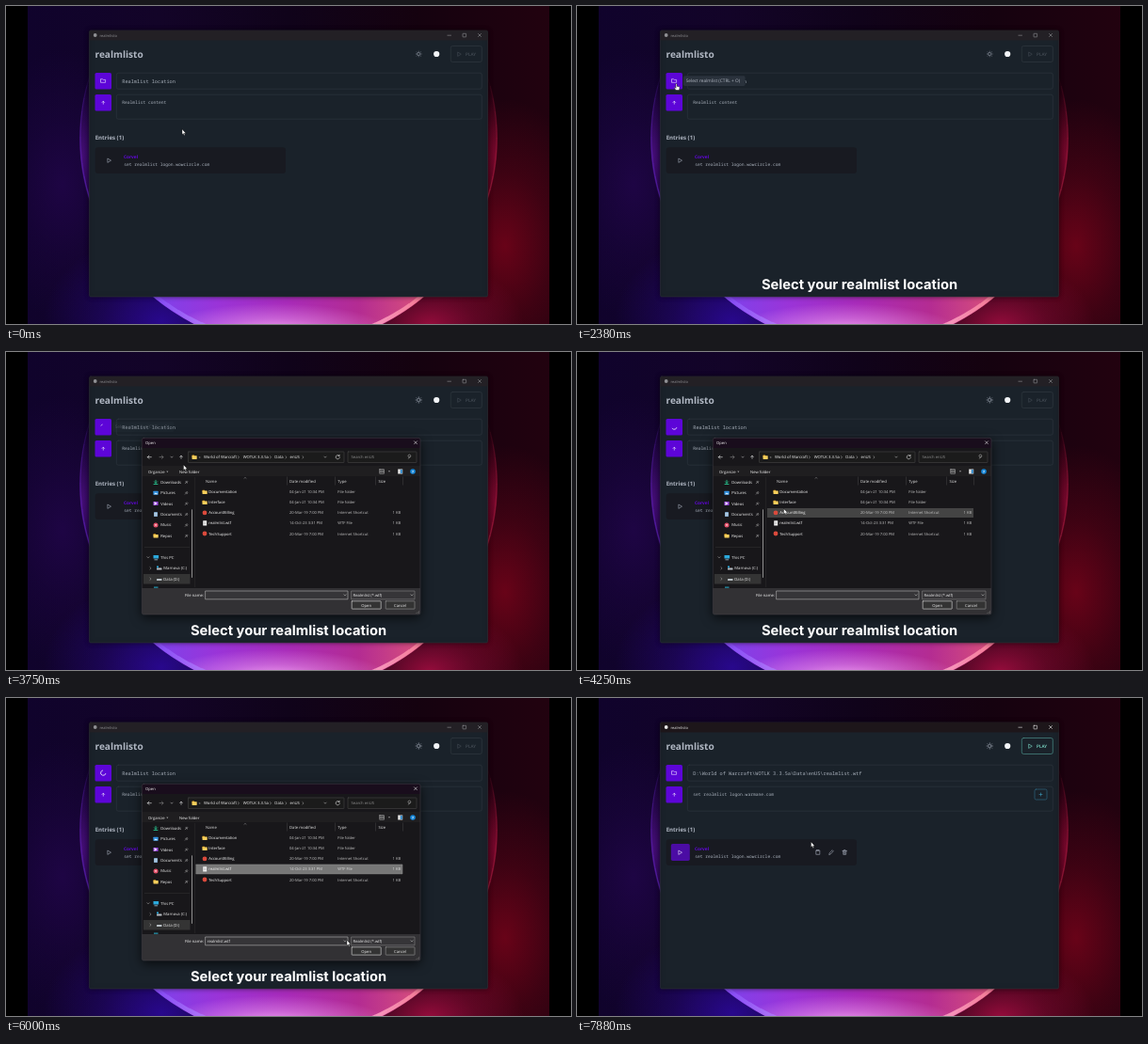
Recreate the animation shown at these times as an HTML page with a canvas. Size 600 px wide and 338 px high, loop 8000 ms.

```html
<!DOCTYPE html>
<html lang="en">
<head>
<meta charset="utf-8">
<title>realmlisto</title>
<style>
  html, body { margin: 0; width: 100%; height: 100%; overflow: hidden; background: #000; }
  canvas { display: block; width: 100vw; height: 100vh; }
</style>
</head>
<body>
<canvas id="stage"></canvas>
<script>
const W = 600, H = 338, LOOP = 8000, TICK = 125;
const SANS = '"Open Sans", "Noto Sans", sans-serif';
const MONO = '"Noto Sans Mono", "DejaVu Sans Mono", monospace';
const canvas = document.getElementById('stage');
const back = document.createElement('canvas');
let c;

const CLICK = 2400, DIALOG_IN = 2875, PICK = 4625, DIALOG_OUT = 6500;
// time, x, y of the pointer tip
const PATH = [
  [0, 187, 131], [375, 187, 131], [1000, 137.5, 99], [1750, 105.5, 82.5],
  [3375, 105.5, 82.5], [3750, 188.5, 120], [4500, 230.5, 183], [5125, 230.5, 183],
  [6000, 362, 257.5], [6250, 381, 268], [6625, 381, 268], [7875, 248.5, 153]
];

const clamp = v => Math.max(0, Math.min(1, v));
const smooth = v => { v = clamp(v); return v * v * (3 - 2 * v); };
const ramp = (t, a, b) => smooth((t - a) / (b - a));

function pointerAt(t) {
  let i = 1;
  while (i < PATH.length - 1 && t > PATH[i][0]) i++;
  const [a, ax, ay] = PATH[i - 1], [b, bx, by] = PATH[i];
  const k = ramp(t, a, b);
  return { x: ax + (bx - ax) * k, y: ay + (by - ay) * k };
}

function box(x, y, w, h, r, fill, stroke, lw = 0.6) {
  c.beginPath();
  c.roundRect(x, y, w, h, r);
  if (fill) { c.fillStyle = fill; c.fill(); }
  if (stroke) { c.strokeStyle = stroke; c.lineWidth = lw; c.stroke(); }
}

function text(s, x, y, size, color, { font = SANS, weight = 400, align = 'left' } = {}) {
  c.font = `${weight} ${size}px ${font}`;
  c.textAlign = align;
  c.fillStyle = color;
  c.fillText(s, x, y);
}

const mono = (s, x, y, size, color) => text(s, x, y, size, color, { font: MONO });

function disc(x, y, r, fill) {
  c.beginPath();
  c.arc(x, y, r, 0, 7);
  c.fillStyle = fill;
  c.fill();
}

// Strokes (or fills) an SVG path moved to x, y
function shape(d, x, y, stroke, lw = 0.6, fill) {
  c.save();
  c.translate(x, y);
  const p = new Path2D(d);
  if (fill) { c.fillStyle = fill; c.fill(p); }
  if (stroke) {
    c.strokeStyle = stroke; c.lineWidth = lw;
    c.lineCap = c.lineJoin = 'round';
    c.stroke(p);
  }
  c.restore();
}

const ICON = {
  folder: 'M-2.4 -1.8H-.9L-.1 -1.1H2.3V1.8H-2.4Z',
  up: 'M0 1.5V-1.4M-1.3 -.2L0 -1.5L1.3 -.2',
  back: 'M2 0H-2M-.4 -1.6L-2 0L-.4 1.6',
  play: 'M-1.5 -2L1.8 0L-1.5 2Z',
  plus: 'M-1.5 0H1.5M0 -1.5V1.5',
  cross: 'M-1.5 -1.5L1.5 1.5M1.5 -1.5L-1.5 1.5',
  right: 'M-.6 -1.1L.6 0L-.6 1.1',
  down: 'M-1.1 -.6L0 .6L1.1 -.6',
  clip: 'M-1 -2H-2V2.3H2V-2H1M-1 -2.5H1V-1.6H-1Z',
  pen: 'M-2.2 2.2L-1.8 .6L1.2 -2.3L2.3 -1.2L-.6 1.8Z',
  bin: 'M-2.2 -1.6H2.2M-1.7 -1.6L-1.4 2.4H1.4L1.7 -1.6M-.8 -1.7V-2.4H.8V-1.7M-.5 -.5V1.3M.5 -.5V1.3',
  pin: 'M-1.3 1.5L0 .2M-.7 -.5L.8 1M-.4 -.2L.6 -1.4L1.6 -.4L.6 .6',
  arrow: 'M0 0V5.6L1.3 4.5L2.2 6.4L3.1 6L2.2 4.2H3.9Z',
  beam: 'M-1.2 -3H-.3L0 -2.6L.3 -3H1.2M0 -2.6V2.6M-1.2 3H-.3L0 2.6L.3 3H1.2',
  hand: 'M-.6 .3Q0 -.4 .6 .3V2.8L3 3.3Q3.7 3.6 3.5 4.6L3 7H-.5L-2.3 4.6Q-2.1 3.5 -.6 4.6Z'
};

function gradient(g, ...stops) {
  stops.forEach((s, i) => g.addColorStop(i / (stops.length - 1), s));
  return g;
}

function glow(x, y, r, color, sx = 1, sy = 1) {
  c.save();
  c.translate(x, y);
  c.scale(sx, sy);
  c.fillStyle = gradient(c.createRadialGradient(0, 0, 0, 0, 0, r), `rgba(${color},1)`, `rgba(${color},.42)`, `rgba(${color},0)`);
  c.fillRect(-r, -r, 2 * r, 2 * r);
  c.restore();
}

function drawBackdrop() {
  c.fillStyle = '#000';
  c.fillRect(0, 0, W, H);
  c.save();
  c.beginPath();
  c.rect(23, 0, 554, H);
  c.clip();
  c.fillStyle = gradient(c.createLinearGradient(23, 0, 577, 0), '#10032c', '#130428', '#10031a', '#15020f', '#22020f');
  c.fillRect(23, 0, 554, H);
  glow(60, 190, 120, '30,5,68', 0.7, 1.2);
  glow(165, 335, 125, '40,8,140', 1, 0.75);
  glow(530, 255, 130, '104,3,24', 0.75, 1.2);
  glow(450, 340, 100, '150,12,60', 1, 0.7);

  const hue = c.createLinearGradient(78, 0, 522, 0);
  gradient(hue, '#5a20b8', '#8a50f5', '#d59cfa', '#f7aee6', '#f5809c', '#a01838');
  c.save();
  c.beginPath();
  c.arc(300, 140, 222, 0, 7);
  c.clip();
  // thin lit crescents beside the app
  glow(80, 160, 75, '70,14,120', 0.3, 1.1);
  glow(520, 160, 75, '118,8,44', 0.3, 1.1);
  c.fillStyle = gradient(c.createLinearGradient(150, 0, 450, 0), '#7a44ee', '#9a34d8', '#a82bb8', '#b42c92', '#dd5578');
  c.fillRect(78, 300, 444, 38);
  glow(285, 348, 100, '246,168,244', 1.25, 0.32);
  c.restore();

  // the rim is brightest and widest at the bottom
  for (let i = 0; i < 64; i++) {
    const a = Math.PI * (-0.14 + i * 0.02), low = Math.max(0, Math.sin(a));
    c.globalAlpha = clamp(0.55 * smooth((Math.sin(a) + 0.42) / 0.5) + 0.6 * low);
    c.strokeStyle = hue;
    c.lineWidth = 1 + 4.5 * low * low;
    c.beginPath();
    c.arc(300, 140, 221.5 - c.lineWidth / 2, a, a + Math.PI * 0.0205);
    c.stroke();
  }
  c.restore();
}

function drawSpinner(t) {
  const s = (t - CLICK) / 1000, p = (s % 1.5) / 1.5, len = 59.7;
  const grow = smooth(p / 0.475);
  const from = 16 * grow + 43 * smooth((p - 0.475) / 0.525);
  const to = Math.min(len, from + 42 * grow);
  const turn = s * Math.PI, unit = 2 * Math.PI / len;
  c.strokeStyle = '#e4dcfa';
  c.lineWidth = 0.9;
  c.lineCap = 'round';
  c.beginPath();
  c.arc(103.3, 79.6, 2.7, from * unit + turn, to * unit + turn);
  c.stroke();
}

function drawSun(x, y) {
  c.strokeStyle = '#a6adbb';
  c.lineWidth = 0.6;
  c.beginPath();
  c.arc(x, y, 1.6, 0, 7);
  for (let i = 0; i < 8; i++) {
    const u = Math.cos(i * Math.PI / 4), v = Math.sin(i * Math.PI / 4);
    c.moveTo(x + u * 2.4, y + v * 2.4);
    c.lineTo(x + u * 3.2, y + v * 3.2);
  }
  c.stroke();
}

function drawApp(t, ptr, modal) {
  const loaded = t >= DIALOG_OUT, active = t >= CLICK && !modal;
  c.save();
  c.shadowColor = 'rgba(0,0,0,.5)';
  c.shadowBlur = 5;
  box(88.5, 26, 423, 283, 1.5, '#1a222a', '#30343a', 0.5);
  c.restore();
  box(88.5, 26, 423, 10.5, [1.5, 1.5, 0, 0], active ? '#1d161a' : '#232025');
  const bar = active ? '#e8e8e8' : '#909094';
  disc(94.7, 31, 1.9, bar);
  text('realmlisto', 99.5, 32.6, 4, bar);
  shape('M-1.8 0H1.8', 470.7, 31.2, bar, 0.6);
  box(485, 29.3, 3.6, 3.6, 0.3, null, bar, 0.6);
  shape(ICON.cross, 503, 31, bar, 0.6);

  text('realmlisto', 94.5, 55, 10.1, '#b0b7c3', { weight: 700 });
  drawSun(438.3, 51);
  disc(457.2, 51, 3.1, '#f2f4f7');
  box(472.3, 42.5, 33, 17, 2, null, loaded ? '#4b8f88' : '#303840', 0.7);
  const go = loaded ? '#7fe0cc' : '#444c55';
  shape(ICON.play, 481.5, 51.2, go, 0.6);
  text('PLAY', 488, 53, 4.7, go, { weight: 600 });

  box(94.5, 71, 17.5, 17.5, 1.6, '#5d05d8');
  if (t >= CLICK && !loaded) drawSpinner(t);
  else shape(ICON.folder, 103.3, 79.5, '#ece4ff', 0.6);
  box(94.5, 94, 17.5, 17.5, 1.6, '#5d05d8');
  shape(ICON.up, 103.3, 102.7, '#ece4ff', 0.65);

  box(117.3, 71.2, 388, 17, 2, null, '#303840');
  box(117.3, 94.2, 388, 26, 2, null, '#303840');
  const ink = '#a8b0bb';
  mono(loaded ? 'D:\\World of Warcraft\\WOTLK 3.3.5a\\Data\\enUS\\realmlist.wtf' : 'Realmlist location', 123.3, 81.8, 5.24, ink);
  mono(loaded ? 'set realmlist logon.warmane.com' : 'Realmlist content', 123.3, 103.6, 4.62, ink);
  if (loaded) {
    box(486, 97, 13, 11, 1.6, null, '#2f657e', 0.7);
    shape(ICON.plus, 492.5, 102.5, '#3c9cbc', 0.6);
  }

  text('Entries (1)', 94.7, 141.5, 6.1, '#b0b7c3', { weight: 700 });
  box(94.7, 150.2, 202.3, 27.8, 3, '#181a21');
  const over = !modal && ptr.x > 95 && ptr.x < 297 && ptr.y > 150.2 && ptr.y < 178;
  if (over) {
    box(99.8, 155, 20, 18, 1.8, '#4b0ca4');
    [ICON.clip, ICON.pen, ICON.bin].forEach((d, i) => shape(d, 255.8 + i * 14.2, 164, '#a6adbb', 0.6));
  }
  shape(ICON.play, 109.7, 164.2, over ? '#ece4ff' : '#a6adbb', 0.6);
  text('Corvel', 125, 162.3, 4.75, '#6207dd', { weight: 700 });
  mono('set realmlist logon.wowcircle.com', 125.2, 169.8, 4.6, ink);

  const tip = ramp(t, 1875, 2125) * (1 - ramp(t, 3500, 3875));
  if (tip > 0) {
    c.globalAlpha = tip;
    box(113, 74.3, 65.6, 10.8, 1.8, '#2a323c');
    text('Select realmlist (CTRL + O)', 115.7, 81.3, 4.75, '#b4bac5');
    c.globalAlpha = 1;
  }
}

function fileFolder(x, y) {
  box(x - 2.5, y - 2.1, 2.6, 2, 0.3, '#d99a1e');
  box(x - 2.5, y - 1.4, 5.2, 3.6, 0.4, '#f6cf5c');
}

function drawNav() {
  const white = '#f0f0f0';
  ['Downloads', 'Pictures', 'Videos', 'Documents', 'Music', 'Repos'].forEach((name, i) => {
    const y = 138.3 + i * 11.4;
    if (i === 0) shape('M0 -2V1M-1.5 -.4L0 1.1L1.5 -.4M-2 2.2H2', 159, y, '#28c08c', 0.9);
    if (i === 1) { box(156.4, y - 2, 5.2, 4, 0.5, '#2f8fe0'); shape('M-2 1.5L-.3 -.3L.6 .6L1.3 0L2 1.5Z', 159, y, null, 0, '#d8f0ff'); }
    if (i === 2) { box(156.4, y - 2, 5.2, 4, 0.5, '#8d3fd0'); shape(ICON.play, 159, y, null, 0, '#f0dcff'); }
    if (i === 3) { box(157, y - 2.5, 4, 5, 0.4, '#7fa6c9'); shape('M-1.1 -1H1.1M-1.1 .2H1.1M-1.1 1.3H.5', 159, y, '#fff', 0.4); }
    if (i === 4) { disc(159, y, 2.5, '#e2506a'); disc(159, y, 0.8, '#ffe4e4'); }
    if (i === 5) fileFolder(159, y);
    text(name, 164.2, y + 1.5, 4.2, white);
    shape(ICON.pin, 191.5, y, '#a8a8a8', 0.5);
  });
  c.fillStyle = '#333';
  c.fillRect(147, 207, 48, 0.5);
  shape(ICON.down, 151, 218.3, '#bbb', 0.5);
  box(156.5, 216, 5.6, 3.6, 0.4, '#2ba9dc');
  shape('M-1.4 0H1.4', 159.3, 220.8, '#bcdff0', 0.7);
  text('This PC', 164.2, 219.8, 4.2, white);
  box(146, 235.9, 49.5, 10.6, 0, '#343434');
  [['Marnova (C:)', 229.8], ['Data (D:)', 241.2]].forEach(([name, y], i) => {
    shape(ICON.right, 153.5, y, '#bbb', 0.5);
    box(160, y - 0.3, 5.5, 2.1, 0.5, '#b9c0c5');
    if (!i) box(160, y - 2.4, 2, 1.8, 0, '#2ba9dc');
    text(name, 167.3, y + 1.5, 4.2, white);
  });
  box(157, 249.5, 4.5, 1.3, 0, '#2490a8');
  // scroll thumb and pane divider
  box(197, 167, 0.9, 73, 0.4, '#9c9c9c');
  c.fillStyle = '#2d2d2d';
  c.fillRect(200.5, 133, 0.6, 117);
}

const FILES = [
  ['Documentation', '04-Jan-21 10:34 PM', 'File folder'],
  ['Interface', '04-Jan-21 10:34 PM', 'File folder'],
  ['AccountBilling', '20-Mar-19 7:00 PM', 'Internet Shortcut', '1 KB'],
  ['realmlist.wtf', '14-Oct-23 3:31 PM', 'WTF File', '1 KB'],
  ['TechSupport', '20-Mar-19 7:00 PM', 'Internet Shortcut', '1 KB']
];

function drawFiles(ptr, picked) {
  const dim = '#c6c6c6';
  [['Name', 212], ['Date modified', 301], ['Type', 352.3], ['Size', 395.5]].forEach(([s, x]) => text(s, x, 138.6, 4.2, '#e2e2e2'));
  shape('M-1.1 .5L0 -.5L1.1 .5', 254, 133.8, '#999', 0.5);
  c.fillStyle = '#444';
  for (const x of [298, 349.3, 392.5, 421.3]) c.fillRect(x, 132.5, 0.5, 9);
  FILES.forEach(([name, date, type, size], i) => {
    const y = 148.8 + i * 11.05, sel = picked && i === 3;
    const over = ptr.x > 202 && ptr.x < 421 && Math.abs(ptr.y - y) < 5.3;
    if (sel) box(202, y - 5, 219, 10, 0, '#777', '#8d8d8d', 0.5);
    else if (over) box(202, y - 5, 219, 10, 0, '#444');
    if (i < 2) fileFolder(211, y);
    else if (i === 3) { box(209.2, y - 2.6, 4, 5.2, 0.3, '#f0f0f0'); shape('M-1 -.8H1M-1 .4H1', 211.2, y, '#999', 0.4); }
    else disc(211, y, 2.4, '#db4a3c');
    const tone = sel ? '#dedede' : dim;
    text(name, 215.3, y + 1.5, 4.15, '#fafafa');
    text(date, 301, y + 1.5, 4.1, tone);
    text(type, 352.3, y + 1.5, 4.05, tone);
    if (size) text(size, 419, y + 1.5, 4.05, tone, { align: 'right' });
  });
}

function drawDialog(t, ptr) {
  const picked = t >= PICK, white = '#f4f4f4', grey = '#bdbdbd';
  c.save();
  c.shadowColor = 'rgba(0,0,0,.75)';
  c.shadowBlur = 12;
  c.shadowOffsetY = 3;
  box(144.3, 91.3, 295.7, 187.7, 2, '#18171a');
  c.restore();
  box(144.3, 91.3, 295.7, 10.7, [2, 2, 0, 0], '#190d1c');
  text('Open', 148, 98.2, 4.2, white);
  shape(ICON.cross, 435, 96.3, white, 0.55);

  shape(ICON.back, 152.3, 111.7, white, 0.6);
  shape('M-2 0H2M.4 -1.6L2 0L.4 1.6', 165, 111.7, '#8b8b8b', 0.6);
  shape(ICON.down, 176, 111.7, grey, 0.55);
  shape(ICON.up, 186, 111.7, white, 0.6);
  box(193.5, 106, 165.5, 11.5, 0.5, '#1b1b1b', '#4c4c4c', 0.5);
  fileFolder(200, 111.7);
  text('«', 204.6, 113, 4.2, grey);
  [['World of Warcraft', 210, 247], ['WOTLK 3.3.5a', 251.7, 281], ['Data', 285.3, 297.5], ['enUS', 301.5, 315.5]].forEach(([s, x, end]) => {
    text(s, x, 113.2, 4.25, white);
    shape(ICON.right, end, 111.8, grey, 0.5);
  });
  shape(ICON.down, 339, 111.7, grey, 0.55);
  shape('M1.6 -1.4A2.1 2.1 0 1 0 2.1 .3M1.8 -2.4V-1.2H.6', 352.3, 111.7, white, 0.55);
  box(363, 106, 73, 11.5, 0.5, '#1b1b1b', '#4c4c4c', 0.5);
  text('Search enUS', 366.5, 113.2, 4.2, '#8e8e8e');
  shape('M.3 .3A1.4 1.4 0 1 1 .4 .2L-1.8 2', 429, 111.2, grey, 0.55);

  c.fillStyle = '#1f1e20';
  c.fillRect(144.3, 121, 295.7, 11);
  text('Organize', 151, 128.5, 4.2, white);
  shape('M-1 -.5L0 .6L1 -.5Z', 171.3, 127.2, null, 0, white);
  text('New folder', 184, 128.5, 4.2, white);
  box(396.7, 124.6, 4.8, 4.8, 0.2, null, grey, 0.5);
  shape('M-2 -1H2M-2 .7H2', 399.1, 127, grey, 0.7);
  shape('M-1 -.5L0 .6L1 -.5Z', 407, 127, null, 0, white);
  box(416.2, 124.5, 5, 5, 0.2, '#e4e4e4');
  box(418.8, 125, 2, 4, 0, '#2f87c8');
  disc(432, 127, 2.8, '#1687d9');
  text('?', 432, 128.5, 4.2, '#fff', { weight: 700, align: 'center' });

  drawNav();
  drawFiles(ptr, picked);

  box(144.3, 251, 295.7, 28, [0, 0, 2, 2], '#323134');
  text('File name:', 210, 260.2, 4.2, white, { align: 'right' });
  box(212, 254, 151, 8.8, 0, '#363538', '#b4b4b4', 0.6);
  if (picked) text('realmlist.wtf', 213.8, 260, 4.2, white);
  shape(ICON.down, 360, 258.4, grey, 0.55);
  box(367, 254, 67, 8.8, 0, '#363538', '#858585', 0.6);
  text('Realmlist (*.wtf)', 368.6, 260, 4.15, white);
  shape(ICON.down, 431, 258.4, grey, 0.55);
  box(367.2, 264.8, 31, 8.3, 0.4, '#333', '#c8c8c8', 0.7);
  text('Open', 382.6, 270.5, 4.2, white, { align: 'center' });
  box(403.2, 264.8, 30.8, 8.3, 0.4, '#333', '#959595', 0.6);
  text('Cancel', 418.5, 270.5, 4.2, white, { align: 'center' });
  c.fillStyle = '#888';
  for (let i = 0; i < 3; i++)
    for (let j = 0; j <= i; j++) c.fillRect(438 - j * 1.2, 275 + i * 1.2, 0.6, 0.6);
  box(144.3, 91.3, 295.7, 187.7, 2, null, '#45424a', 0.5);
}

function drawPointer({ x, y }, modal) {
  const inside = (x0, y0, x1, y1) => x > x0 && x < x1 && y > y0 && y < y1;
  if (!modal && inside(95, 71, 112, 111)) shape(ICON.hand, x, y, '#111', 0.5, '#fff');
  else if (!modal && (inside(117, 71, 505, 88) || inside(117, 94, 505, 120))) shape(ICON.beam, x, y, '#e8e8e8', 0.6);
  else shape(ICON.arrow, x, y, '#111', 0.4, '#fff');
}

function render(t) {
  const ptr = pointerAt(t), modal = t >= DIALOG_IN && t < DIALOG_OUT;
  c.drawImage(back, 0, 0, W, H);
  drawApp(t, ptr, modal);
  if (modal) drawDialog(t, ptr);
  c.globalAlpha = ramp(t, 375, 875) * (1 - ramp(t, 7125, 7625));
  text('Select your realmlist location', 300, 301.3, 14.7, '#fff', { font: 'Inter, sans-serif', weight: 700, align: 'center' });
  c.globalAlpha = 1;
  drawPointer(ptr, modal);
}

function resize() {
  const k = devicePixelRatio || 1;
  for (const el of [back, canvas]) {
    el.width = Math.round(innerWidth * k);
    el.height = Math.round(innerHeight * k);
    c = el.getContext('2d');
    c.scale(el.width / W, el.height / H);
    c.textRendering = 'geometricPrecision';
    if (el === back) drawBackdrop();
  }
}

const start = performance.now();
function frame() {
  const ms = (performance.now() - start) % LOOP;
  render(Math.floor(ms / TICK) * TICK);
  requestAnimationFrame(frame);
}
addEventListener('resize', resize);
resize();
frame();
</script>
</body>
</html>
```
